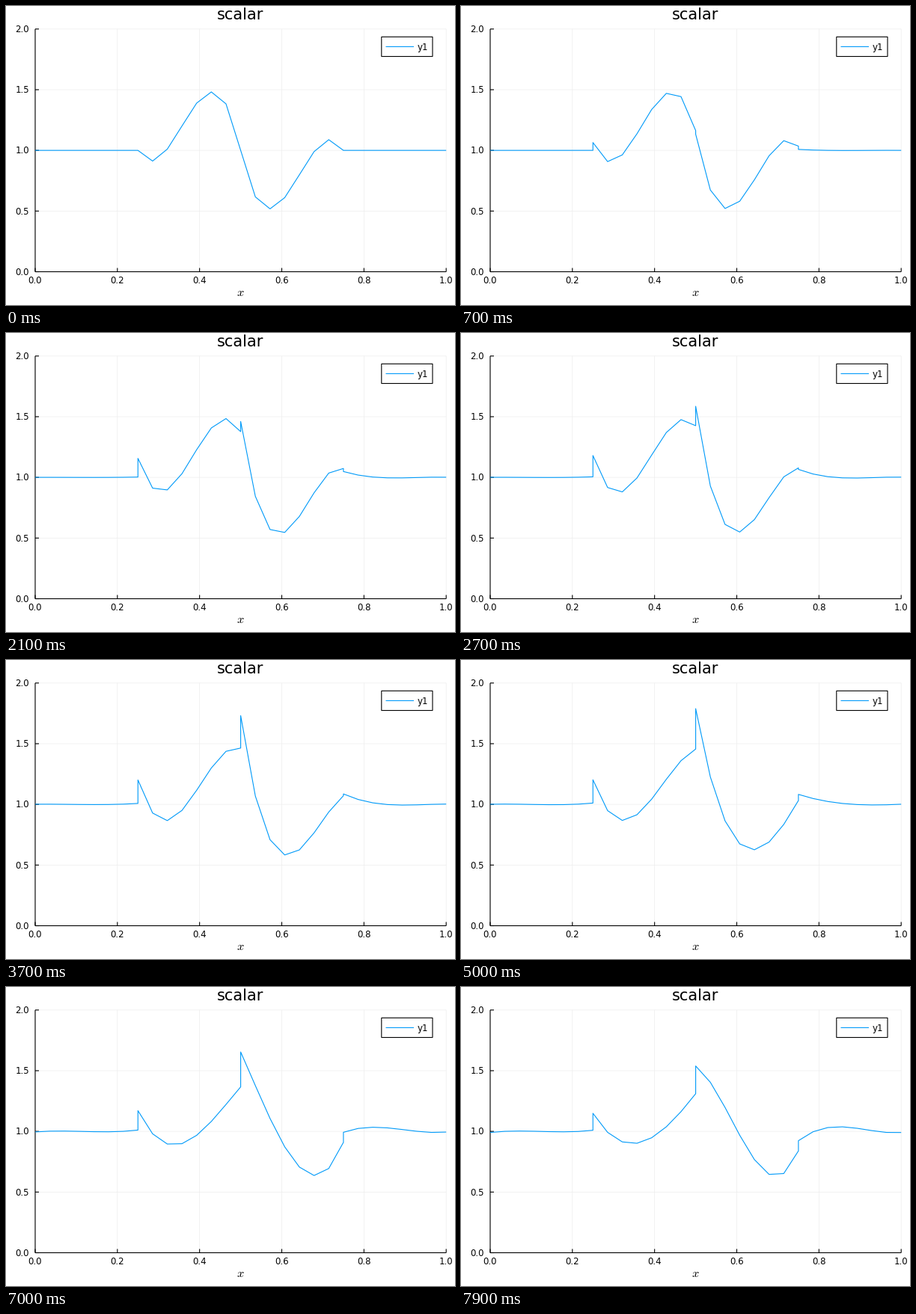
A matplotlib script that plays this animation: 600x400 px, repeating every 8000 ms.

```python
import numpy as np
import matplotlib.pyplot as plt
from matplotlib.animation import FuncAnimation
from matplotlib.patches import Rectangle

plt.rcParams["font.family"] = "DejaVu Sans"
plt.rcParams["mathtext.fontset"] = "cm"

FRAMES, STEP = 80, 100
LEFT, RIGHT, TOP, BOTTOM = 39, 588.2, 30.8, 355.5
BLUE, GRID = "#009af9", "#ededed"
LINE = 0.8

# Inviscid Burgers equation, discontinuous Galerkin on cubic Lobatto cells
CELLS = 4
WIDTH = 1 / CELLS
DT = 1 / 750
SUBSTEPS = 2

nodes = (1 + np.array([-1, -1 / 5 ** 0.5, 1 / 5 ** 0.5, 1])) / 2
powers = np.arange(4)
to_coeffs = np.linalg.inv(nodes[:, None] ** powers)
slopes = powers * nodes[:, None] ** np.maximum(powers - 1, 0)
DIFF = slopes @ to_coeffs
END_WEIGHT = 1 / 12

local = np.linspace(0, 1, 8)
TO_POINTS = local[:, None] ** powers @ to_coeffs
starts = np.arange(CELLS)[:, None] * WIDTH
xs = (starts + local * WIDTH).ravel()


def initial(x):
    d = 0.5 - x
    return 1 + np.where(abs(d) < 1 / 6, 0.5 * np.sin(6 * np.pi * d), 0)


def rate(u):
    f = u * u / 2
    a, b = np.roll(u[:, -1], 1), u[:, 0]
    speed = np.maximum(abs(a), abs(b))
    enter = (a * a + b * b) / 4 - speed * (b - a) / 2
    leave = np.roll(enter, -1)
    du = -f @ DIFF.T
    du[:, 0] += (enter - f[:, 0]) / END_WEIGHT
    du[:, -1] -= (leave - f[:, -1]) / END_WEIGHT
    return du / WIDTH


def advance(u, dt):
    k1 = rate(u)
    k2 = rate(u + dt / 2 * k1)
    k3 = rate(u + dt / 2 * k2)
    k4 = rate(u + dt * k3)
    return u + dt / 6 * (k1 + 2 * k2 + 2 * k3 + k4)


def solve():
    u = initial(starts + nodes * WIDTH)
    waves = []
    for _ in range(FRAMES):
        waves.append((u @ TO_POINTS.T).ravel())
        for _ in range(SUBSTEPS):
            u = advance(u, DT / SUBSTEPS)
    return waves


def px(x):
    return LEFT + (RIGHT - LEFT) * x


def py(y):
    return BOTTOM + (TOP - BOTTOM) * y / 2


fig = plt.figure(figsize=(6, 4), dpi=100, facecolor="white")
ax = fig.add_axes([0, 0, 1, 1])
ax.set_xlim(0, 600)
ax.set_ylim(400, 0)
ax.axis("off")


def stroke(x, y, color="black", lw=LINE, z=2):
    return ax.plot(x, y, color=color, lw=lw, zorder=z, snap=False,
                   solid_capstyle="butt", solid_joinstyle="round")[0]


def label(x, y, text, size, ha="center"):
    ax.text(x, y, text, size=size, ha=ha, va="baseline", zorder=6)


for v in np.arange(6) / 5:
    x = px(v)
    stroke([x, x], [TOP, BOTTOM], GRID, 0.5, 1)
    stroke([x, x], [BOTTOM, BOTTOM - 5])
    label(x, 371.3, f"{v:.1f}", 8.5)

for v in np.arange(5) / 2:
    y = py(v)
    stroke([LEFT, RIGHT], [y, y], GRID, 0.5, 1)
    stroke([LEFT, LEFT + 5], [y, y])
    label(31.2, y + 4.2, f"{v:.1f}", 8.5, "right")

stroke([LEFT, RIGHT], [BOTTOM, BOTTOM])
stroke([LEFT, LEFT], [TOP, BOTTOM])
label(313.2, 18.2, "scalar", 15)
label(313, 388, "$x$", 11.8)

ax.add_patch(Rectangle((501.8, 41.3), 68.2, 26.2, fc="white", ec="black",
                       lw=LINE, snap=False, zorder=4))
stroke([507.5, 545], [54.4, 54.4], BLUE, z=5)
label(550, 58.5, "y1", 8.5, "left")

waves = solve()
curve = stroke(px(xs), py(waves[0]), BLUE, z=3)


def update(i):
    curve.set_ydata(py(waves[i]))
    return [curve]


anim = FuncAnimation(fig, update, frames=FRAMES, interval=STEP,
                     repeat=True, repeat_delay=0)
plt.show()
```
